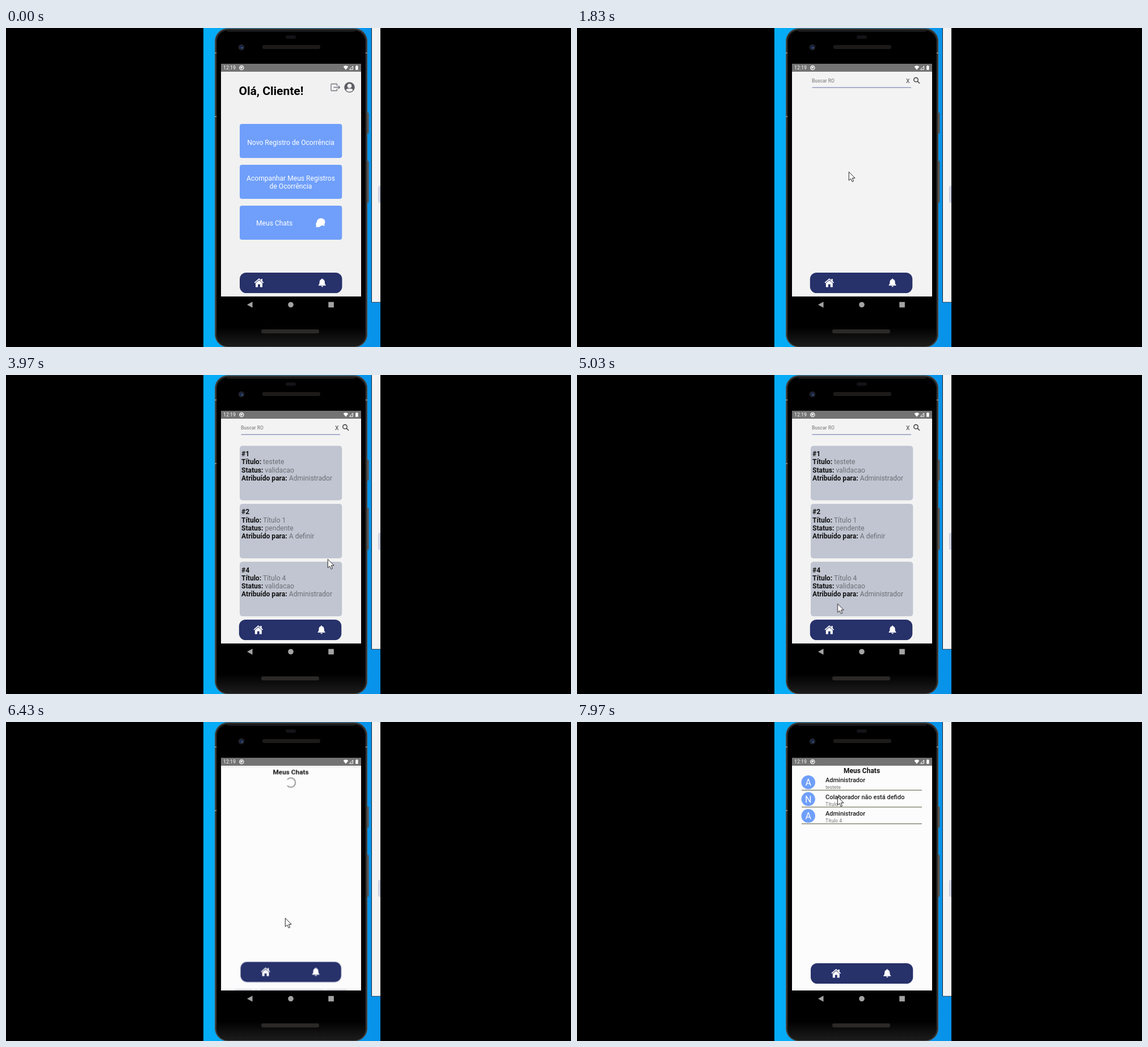
An HTML page that plays this animation: 996 by 562 pixels, repeating every 8 s.

```html
<!DOCTYPE html>
<html lang="pt">
<head>
<meta charset="utf-8">
<title>Registro de Ocorrência</title>
<style>
html, body { margin: 0; width: 100%; height: 100%; overflow: hidden; background: #000; }
svg { display: block; width: 996px; height: 562px; font-family: Roboto, sans-serif; }

/* 1% of the loop is 80 ms */
.home, .list, .chats, .cards, .rows, .spinner, .track, .chat, .cursor {
  animation: 8s linear infinite;
}
.page { transform-origin: 502.5px 275px; }
.home { animation-name: home; }
.list { animation-name: list; }
.chats { animation-name: chats; }
.cards { animation-name: cards; }
.rows { animation-name: rows; }
.spinner { animation-name: spinner; transform-origin: 502px 104px; }
.track { animation-name: pressTrack; }
.chat { animation-name: pressChat; }
.cursor { animation-name: cursor; }

@keyframes home {
  0% { transform: none; opacity: 1; }
  17.81% { transform: none; opacity: 1; animation-timing-function: cubic-bezier(.208, .82, .25, 1); }
  22.81% { transform: scale(1.1); opacity: 0; }
  64% { transform: scale(1.1); opacity: 0; animation-timing-function: cubic-bezier(.208, .82, .25, 1); }
  69%, 78.4% { transform: none; opacity: 1; animation-timing-function: cubic-bezier(.208, .82, .25, 1); }
  83%, 100% { transform: scale(1.1); opacity: 0; }
}
@keyframes list {
  0%, 17.81% { transform: scale(.85); opacity: 0; animation-timing-function: ease-out; }
  18.9% { transform: scale(.963); opacity: 0; animation-timing-function: ease-out; }
  19.5% { transform: scale(.981); opacity: 1; animation-timing-function: ease-out; }
  22.81%, 64% { transform: none; opacity: 1; animation-timing-function: ease-out; }
  65.5% { transform: scale(.975); opacity: 0; }
  69%, 100% { transform: scale(.9); opacity: 0; }
}
@keyframes chats {
  0%, 78.4% { transform: scale(.85); opacity: 0; animation-timing-function: ease-out; }
  79.5% { transform: scale(.963); opacity: 0; animation-timing-function: ease-out; }
  80.1% { transform: scale(.981); opacity: 1; animation-timing-function: ease-out; }
  83%, 100% { transform: none; opacity: 1; }
}
@keyframes cards {
  0% { opacity: 0; animation-timing-function: step-end; }
  30.87%, 100% { opacity: 1; }
}
@keyframes rows {
  0% { opacity: 0; animation-timing-function: step-end; }
  89.62%, 100% { opacity: 1; }
}
@keyframes spinner {
  0%, 79% { transform: rotate(-130deg); opacity: 1; }
  83.37% { transform: none; opacity: 1; }
  85.37% { transform: rotate(50deg); opacity: 1; }
  89.61% { transform: rotate(50deg); opacity: 1; }
  89.62%, 100% { transform: rotate(50deg); opacity: 0; }
}
@keyframes pressTrack {
  0%, 15% { opacity: 1; }
  16.9%, 18.4% { opacity: .2; }
  21.5%, 100% { opacity: 1; }
}
@keyframes pressChat {
  0%, 75.6% { opacity: 1; }
  77.5%, 79.4% { opacity: .2; }
  82.5%, 100% { opacity: 1; }
}
@keyframes cursor {
  0%, 2.5% { transform: translate(668px, 420px); }
  10.9% { transform: translate(506px, 276px); animation-timing-function: ease-out; }
  14.5%, 31.2% { transform: translate(479px, 253px); animation-timing-function: ease-in-out; }
  39%, 41.2% { transform: translate(486px, 246px); }
  44.4% { transform: translate(518px, 172px); }
  47.5% { transform: translate(560px, 260px); }
  51.5% { transform: translate(573px, 380px); }
  56% { transform: translate(520px, 438px); animation-timing-function: ease-out; }
  59%, 61.5% { transform: translate(446px, 446px); }
  62.87% { transform: translate(459px, 403px); animation-timing-function: ease-out; }
  68.5%, 70.87% { transform: translate(493px, 322px); }
  72.2% { transform: translate(494px, 343px); }
  73.37%, 89.6% { transform: translate(492px, 345px); animation-timing-function: ease-in-out; }
  98%, 100% { transform: translate(459px, 131px); }
}

.btn rect { fill: #6f9ffa; }
.btn text { fill: #fff; font-size: 12.1px; }
.mid { text-anchor: middle; }
.card { font-size: 12.1px; fill: #6b6e75; white-space: pre; }
.card rect { fill: #c0c5d1; }
.card tspan { fill: #111; font-weight: 700; }
.row .ball { fill: #6f9ffa; }
.row .letter { fill: #fff; font-size: 16px; text-anchor: middle; }
.row .name { fill: #1c1c1c; font-size: 11px; font-weight: 500; }
.row .sub { fill: #777; font-size: 8.7px; }
.row line { stroke: #76745f; stroke-width: 1.3; }
.line { fill: none; stroke-linecap: round; stroke-linejoin: round; }
</style>
</head>
<body>
<svg viewBox="0 0 996 562">
  <defs>
    <linearGradient id="sky" x2="1">
      <stop offset="0" stop-color="#05adf7"/>
      <stop offset="1" stop-color="#0892ea"/>
    </linearGradient>
    <linearGradient id="body" x2="0" y2="1">
      <stop offset=".94" stop-color="#000"/>
      <stop offset="1" stop-color="#1d1c1c"/>
    </linearGradient>
    <clipPath id="desk"><rect x="348" width="312" height="562"/></clipPath>
    <clipPath id="screen"><rect x="379" y="77" width="247" height="396"/></clipPath>
    <g id="house" fill="#fff">
      <path d="M0-8 8.3-.8 7.2.5 0-5.7-7.2.5-8.3-.8Z"/>
      <path d="M3.6-7H5.9V-1.5H3.6Z"/>
      <path d="M0-4.6 6 .6V7.4H1.9V2.6H-1.9V7.4H-6V.6Z"/>
    </g>
    <path id="bell" fill="#fff" d="M-.9-7.6H.9V-6.6C3.4-6 4.6-4 4.6-1.6 4.6 1.6 5.3 2.6 6.5 3.8V4.8H-6.5V3.8C-5.3 2.6-4.6 1.6-4.6-1.6-4.6-4-3.4-6-.9-6.6ZM-2 5.6H2C1.8 7-.2 8.2-2 5.6Z"/>
    <g id="bar">
      <rect x="412" y="431" width="180.5" height="36" rx="11.5" fill="#27316a"/>
      <use href="#house" x="446" y="449"/>
      <use href="#bell" x="557.3" y="449"/>
    </g>
  </defs>

  <rect width="996" height="562"/>
  <g clip-path="url(#desk)">
    <rect x="348" width="312" height="562" fill="url(#sky)"/>
    <path d="M644.5-1V483H662" fill="#f3f3f3" stroke="#123"/>
    <path d="M645 0H660V482.5H645Z" fill="#f3f3f3"/>
    <rect x="656" y="278" width="8" height="30" rx="3" fill="#cdd1e2"/>

    <!-- phone -->
    <g fill="#57534f">
      <rect x="635" y="149" width="4.5" height="37" rx="1.5"/>
      <rect x="635" y="234" width="4.5" height="74" rx="1.5"/>
    </g>
    <rect x="368.6" y="1" width="268" height="561" rx="22" fill="#302e2d" stroke="#56524f"/>
    <rect x="371.5" y="4" width="262" height="556" rx="20" fill="url(#body)" stroke="#121212"/>
    <path d="M390 5.5H615" stroke="#343434"/>
    <path d="M368 44H371M634 44H637M368 156H371" stroke="#8a8580" stroke-width="2"/>
    <circle cx="415" cy="34" r="5.3" fill="#20232c"/>
    <circle cx="415" cy="34" r="2.8" fill="#16264e"/>
    <circle cx="416" cy="35" r="1" fill="#6d86bd"/>
    <rect x="493" y="13" width="18" height="6" rx="3" fill="#131318"/>
    <rect x="452" y="30" width="102" height="7" rx="3" fill="#1d1b1a"/>
    <rect x="450" y="531" width="102" height="7" rx="3" fill="#2a2928"/>

    <!-- status bar -->
    <rect x="379" y="63" width="247" height="14" fill="#737373"/>
    <g fill="#fff">
      <text x="383" y="73" font-size="8.8">12:19</text>
      <circle cx="415.3" cy="70" r="3.6" fill="none" stroke="#fff" stroke-width="1.3"/>
      <path d="M413.5 68H417V70L415.5 71.5H413.5Z"/>
      <path d="M594.5 68Q599-64 603.5 68L599 73.8Z" display="none"/>
      <path d="M594.6 68Q599 64.4 603.4 68L599 73.8Z"/>
      <path d="M605.5 73.2 611.5 67V73.2Z" fill="none" stroke="#fff"/>
      <path d="M616.2 67H617.2V66H619.6V67H620.6V73.8H616.2Z"/>
    </g>
    <g fill="#a3a3a3">
      <path d="M425 487.5 434.5 482.3V492.7Z"/>
      <circle cx="502" cy="487.5" r="4.8"/>
      <rect x="568.3" y="482.7" width="9.6" height="9.6"/>
    </g>

    <g clip-path="url(#screen)">
      <rect x="379" y="77" width="247" height="396" fill="#f1f1f1"/>

      <g class="page home">
        <rect x="379" y="77" width="247" height="396" fill="#f1f1f1"/>
        <text x="410.5" y="117.5" font-size="21" font-weight="700">Olá, Cliente!</text>
        <path class="line" stroke="#74747e" stroke-width="1.3" d="M583.5 101.5V99Q583.5 98.5 583 98.5H574Q573 98.5 573 99.5V109.5Q573 110.5 574 110.5H583Q583.5 110.5 583.5 110V107.5M578 104.5H588.5M586 102 588.5 104.5 586 107"/>
        <circle cx="605.5" cy="104.5" r="9.2" fill="#5d5d64"/>
        <circle cx="605.5" cy="102" r="3.8" fill="#f1f1f1"/>
        <path d="M599.2 109.5Q600.2 106.8 603 106.8H608Q610.8 106.8 611.8 109.5 609.5 112.2 605.5 112.2 601.5 112.2 599.2 109.5Z" fill="#f1f1f1"/>
        <g class="btn">
          <rect x="412" y="169" width="180.3" height="60" rx="4"/>
          <text class="mid" x="502" y="205.7">Novo Registro de Ocorrência</text>
        </g>
        <g class="btn track">
          <rect x="412" y="241" width="180.3" height="60" rx="4"/>
          <text class="mid" x="502" y="269">Acompanhar Meus Registros</text>
          <text class="mid" x="502" y="283.2">de Ocorrência</text>
        </g>
        <g class="btn chat">
          <rect x="412" y="313" width="180.3" height="60" rx="4"/>
          <text x="441" y="347.8">Meus Chats</text>
          <g fill="#fff">
            <path d="M546 351Q547.4 349 546.7 347.5C545 343 549 340.5 552 341.5 556 343 557 347 554 349.7 551.5 351.5 548.5 350.5 546 351Z"/>
            <path d="M555.5 335.2C560 335.2 562.5 338.3 562.5 341.8 562.5 343.5 561.7 345 561.2 345.8Q561.2 347.5 562.3 348.8 560 348.8 558.6 347.8 555.5 349 552 347.5C546 345 546.5 335.2 555.5 335.2Z"/>
          </g>
        </g>
        <use href="#bar"/>
      </g>

      <g class="page list">
        <rect x="379" y="77" width="247" height="396" fill="#f3f3f3"/>
        <text x="414" y="95.6" font-size="8.5" font-weight="500" fill="#8b8b8b">Buscar RO</text>
        <path d="M414.5 104.8H589" stroke="#7f87b5" stroke-width="1.2"/>
        <text x="580" y="96.5" font-size="10.5" fill="#444">X</text>
        <path class="line" stroke="#333" stroke-width="1.4" d="M600.2 94 603.6 97.3M601.2 91.2A3.7 3.7 0 1 1 593.8 91.2 3.7 3.7 0 1 1 601.2 91.2"/>
        <g class="cards"></g>
        <use href="#bar" x="-1.2"/>
      </g>

      <g class="page chats">
        <rect x="379" y="77" width="247" height="396" fill="#fcfcfc"/>
        <text class="mid" x="502" y="89.6" font-size="12" font-weight="700" fill="#111">Meus Chats</text>
        <path class="spinner" fill="none" stroke="#858585" stroke-width="1.7" d="M507.3 97.6A8.3 8.3 0 1 1 496.4 97.9"/>
        <g class="rows"></g>
        <rect x="412" y="425" width="180.3" height="36" rx="11.5" fill="#27316a"/>
        <use href="#house" x="456.8" y="443"/>
        <use href="#bell" x="546.8" y="443"/>
      </g>
    </g>

    <path class="cursor" fill="#fff" stroke="#222" stroke-width="1" stroke-linejoin="round" d="M.3.5V15.6L3.8 12.5 6.2 17.8 8.6 16.8 6.3 11.4H11Z"/>
  </g>
</svg>
<script>
const cards = [
  [1, "testete", "validacao", "Administrador"],
  [2, "Título 1", "pendente", "A definir"],
  [4, "Título 4", "validacao", "Administrador"],
];
const rows = [
  ["A", "Administrador", "testete"],
  ["N", "Colaborador não está defido", "Título 1"],
  ["A", "Administrador", "Título 4"],
];
const fill = (name, items, draw) => {
  document.querySelector(name).innerHTML = items.map(draw).join("");
};

fill(".cards", cards, ([id, title, status, owner], i) => {
  const lines = [["#" + id, ""], ["Título:", " " + title],
    ["Status:", " " + status], ["Atribuído para:", "  " + owner]];
  const text = lines.map(([label, value], n) =>
    `<text x="415" y="${143.2 + n * 14.2}"><tspan>${label}</tspan>${value}</text>`);
  return `<g class="card" transform="translate(0 ${i * 102.2})">
    <rect x="412" y="124.7" width="180.3" height="96" rx="5"/>${text.join("")}</g>`;
});

fill(".rows", rows, ([letter, name, sub], i) =>
  `<g class="row" transform="translate(0 ${i * 29.6})">
    <circle class="ball" cx="407.7" cy="106.2" r="12.2"/>
    <text class="letter" x="407.7" y="112">${letter}</text>
    <text class="name" x="438" y="106">${name}</text>
    <text class="sub" x="438" y="118.3">${sub}</text>
    <line x1="396" x2="608" y1="120.2" y2="120.2"/></g>`);
</script>
</body>
</html>
```
